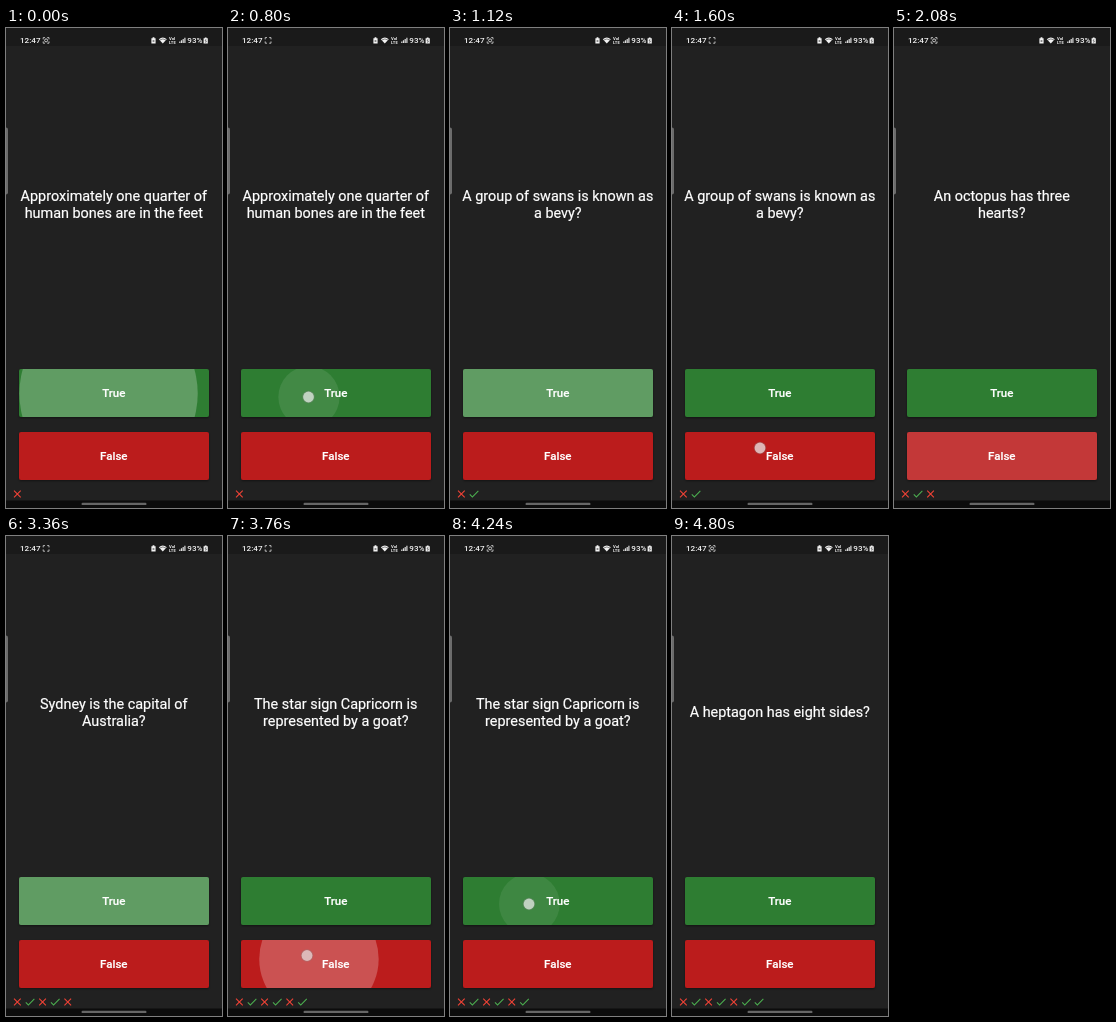
An HTML page that plays this animation: 216 by 480 pixels, repeating every 5.28 s.

```html
<!DOCTYPE html>
<html lang="en">
<head>
<meta charset="utf-8">
<title>True or false quiz</title>
<style>
  html, body { margin: 0; width: 100%; height: 100%; overflow: hidden; background: #212121; }
  svg { display: block; width: 100%; height: 100%; font-family: Roboto, "Noto Sans", sans-serif; }
  .question { font-size: 14.42px; fill: #fff; stroke: #fff; stroke-width: .22; text-anchor: middle; }
  .label { font-size: 11.5px; font-weight: 500; fill: #fff; stroke: #fff; stroke-width: .2; text-anchor: middle; }
  .status { font-size: 8.1px; font-weight: 500; fill: #f2f2f2; }
  .network { font-size: 4.2px; font-weight: 700; }
</style>
</head>
<body>
<svg viewBox="0 0 216 480">
  <defs>
    <clipPath id="clipTrue"><rect x="13" y="341" width="190" height="48" rx="2"/></clipPath>
    <clipPath id="clipFalse"><rect x="13" y="404" width="190" height="48" rx="2"/></clipPath>
    <filter id="shadow" x="-5%" y="-10%" width="110%" height="130%">
      <feDropShadow dx="0" dy="1" stdDeviation="0.8" flood-opacity="0.45"/>
    </filter>
  </defs>

  <rect width="216" height="480" fill="#212121"/>
  <rect width="216" height="18" fill="#1a1a1a"/>
  <rect y="472.5" width="216" height="7.5" fill="#0c0c0c"/>
  <rect x="75.5" y="474.7" width="65" height="2.4" rx="1.2" fill="#666"/>
  <rect x="-3" y="99.5" width="5" height="67" rx="2" fill="#6c6c6c"/>

  <g class="status">
    <text x="14" y="15">12:47</text>
    <text x="181.3" y="15">93%</text>
    <g fill="none" stroke="#ddd" stroke-width=".8">
      <path d="M37.2 11.4V9.6H39M41.2 9.6H43v1.8M43 13.4v1.8h-1.8M39 15.2h-1.8v-1.8"/>
      <path d="M173.8 15v-1.5M175.5 15v-2.7M177.2 15v-4M178.9 15V9.7" stroke-width="1.2"/>
    </g>
    <circle id="scanDot" cx="40.1" cy="12.4" r="1.5" fill="none" stroke="#ddd" stroke-width=".9"/>
    <path d="M145.4 10.2h1.2v-.9h1.8v.9h1.2v5.4h-4.2z"/>
    <path d="M146.6 13h1.8" stroke="#222"/>
    <path d="M152.8 11.2q4-3.2 8 0l-4 4.4z"/>
    <path d="M153.6 12.1q3.3-2.3 6.6 0" fill="none" stroke="#1a1a1a" stroke-width=".5"/>
    <g class="network">
      <text x="163" y="12.2">VoI</text>
      <text x="163" y="15.7">LTE</text>
    </g>
    <path d="M197.6 10.2h1.2v-.8h1.8v.8h1.2v5.4h-4.2z"/>
    <path d="M200.1 11l-1.1 2h1.5l-1 1.8" stroke="#222" stroke-width=".5" fill="none"/>
  </g>

  <g id="question" class="question"></g>

  <rect x="13" y="341" width="190" height="48" rx="2" fill="#2e7d32" filter="url(#shadow)"/>
  <rect x="13" y="404" width="190" height="48" rx="2" fill="#bb1c1c" filter="url(#shadow)"/>
  <g id="ripples" fill="#fff"></g>
  <text class="label" x="107.8" y="368.8">True</text>
  <text class="label" x="107.8" y="431.8">False</text>
  <g id="marks"></g>
  <g id="touch">
    <circle id="halo" r="6.2" fill="#888"/>
    <circle id="core" r="5.4" fill="#fff"/>
  </g>
</svg>
<script>
const LOOP = 5280, STEP = 80;
const byId = id => document.getElementById(id);

const questions = [
  ["Approximately one quarter of", "human bones are in the feet"],
  ["A group of swans is known as", "a bevy?"],
  ["An octopus has three", "hearts?"],
  ["Mount Kilimanjaro is the", "highest mountain in the", "world?"],
  ["Sydney is the capital of", "Australia?"],
  ["The star sign Capricorn is", "represented by a goat?"],
  ["A heptagon has eight sides?"]
];

// show/hide: touch dot; down/up: finger press and release
const taps = [
  { answer: true,  correct: false, x: 79,   y: 368, show: -200, down: -145, up: -106, hide: -20 },
  { answer: true,  correct: true,  x: 80.5, y: 369, show: 770,  down: 770,  up: 900,  hide: 1020 },
  { answer: false, correct: false, x: 88,   y: 420, show: 1490, down: 1640, up: 1780, hide: 1890 },
  { answer: true,  correct: true,  x: 77,   y: 368, show: 2370, down: 2385, up: 2430, hide: 2690 },
  { answer: true,  correct: false, x: 80,   y: 368, show: 3090, down: 3115, up: 3175, hide: 3300 },
  { answer: false, correct: true,  x: 79,   y: 419.5, show: 3640, down: 3660, up: 3716, hide: 3900 },
  { answer: true,  correct: true,  x: 79,   y: 368, show: 4190, down: 4215, up: 4265, hide: 4400 }
];
const dotToggles = [480, 960, 1440, 2000, 2240, 2960, 3360, 3920, 4400, 4800];

const CLOSE = "M19 6.41 17.59 5 12 10.59 6.41 5 5 6.41 10.59 12 5 17.59 6.41 19 12 13.41 17.59 19 19 17.59 13.41 12z";
const CHECK = "M9 16.17 4.83 12l-1.42 1.41L9 19 21 7l-1.41-1.41z";

const clamp = v => Math.min(1, Math.max(0, v));
const mix = (a, b, k) => a + (b - a) * k;

function add(parent, name, attrs, text) {
  const el = document.createElementNS("http://www.w3.org/2000/svg", name);
  set(el, attrs);
  if (text) el.textContent = text;
  parent.append(el);
  return el;
}
function set(el, attrs) {
  for (const key in attrs) el.setAttribute(key, attrs[key]);
}

// cubic-bezier(.25, .1, .25, 1)
function ease(x) {
  let lo = 0, hi = 1;
  const curve = (a, b, s) => 3 * a * s * (1 - s) ** 2 + 3 * b * s * s * (1 - s) + s ** 3;
  for (let i = 0; i < 18; i++) {
    const mid = (lo + hi) / 2;
    if (curve(.25, .25, mid) < x) lo = mid; else hi = mid;
  }
  return curve(.1, 1, lo);
}

const questionEls = questions.map(lines => {
  const group = add(byId("question"), "g", {});
  lines.forEach((line, i) =>
    add(group, "text", { x: 107.8, y: 181 + (i - (lines.length - 1) / 2) * 17 }, line));
  return group;
});
const markEls = taps.map((tap, i) => add(byId("marks"), "path", {
  d: tap.correct ? CHECK : CLOSE,
  fill: tap.correct ? "#4caf50" : "#f44336",
  transform: `translate(${5 + i * 12.6} 459.6) scale(.53)`
}));
const rippleEls = taps.map(tap => {
  const group = add(byId("ripples"), "g", { "clip-path": `url(#clip${tap.answer ? "True" : "False"})` });
  return add(group, "circle", {});
});

function drawRipple(el, tap, t) {
  const press = Math.max(0, Math.min(t, tap.up) - tap.down) / 1000;
  const release = Math.max(0, t - tap.up);
  const k = ease(clamp(press + release / 225));
  const fade = clamp((t - tap.down) / 75) * (1 - clamp((release - 225) / 150));
  set(el, {
    cx: mix(tap.x, 108, k),
    cy: mix(tap.y, tap.answer ? 365 : 428, k),
    r: mix(29.4, 103, k),
    opacity: .24 * fade
  });
}

function draw(t) {
  const answered = taps.filter(tap => tap.up <= t).length;
  questionEls.forEach((el, i) => set(el, { visibility: i === answered - 1 ? "visible" : "hidden" }));
  markEls.forEach((el, i) => set(el, { visibility: i < answered ? "visible" : "hidden" }));
  rippleEls.forEach((el, i) => drawRipple(el, taps[i], t));

  const toggles = dotToggles.filter(at => at <= t).length;
  set(byId("scanDot"), { visibility: toggles % 2 ? "hidden" : "visible" });

  const tap = taps.find(p => t >= p.show && t < p.hide);
  set(byId("touch"), { visibility: tap ? "visible" : "hidden" });
  if (tap) {
    const left = clamp((tap.hide - t) / 150);
    set(byId("touch"), { transform: `translate(${tap.x} ${tap.y})` });
    set(byId("halo"), { opacity: .35 * Math.sqrt(left) });
    set(byId("core"), { opacity: .62 * left * left });
  }
}

const start = performance.now();
function tick() {
  const t = (performance.now() - start + 8) % LOOP;
  draw(Math.floor(t / STEP) * STEP);
  requestAnimationFrame(tick);
}
tick();
</script>
</body>
</html>
```
